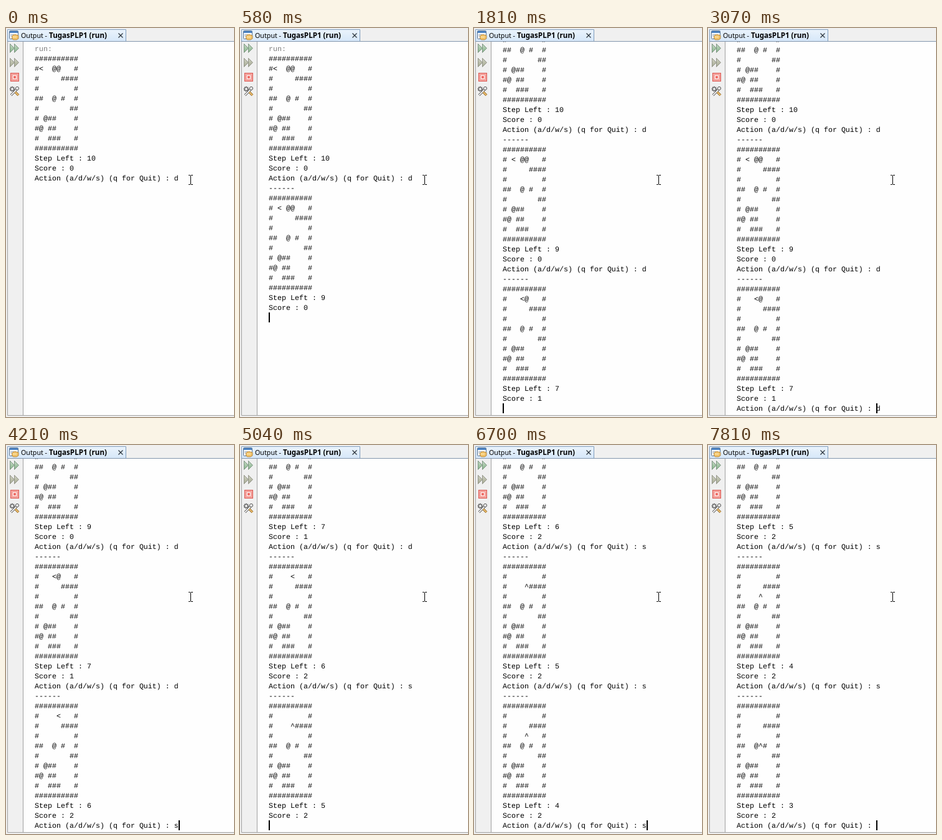
Write an HTML page that moves like this. It is 366x625 px and loops after 8000 ms.

```html
<!DOCTYPE html>
<html lang="en">
<head>
<meta charset="utf-8">
<title>Console game</title>
<style>
  html, body { margin: 0; width: 100%; height: 100%; overflow: hidden; background: #f0f0f0; }
  svg { display: block; }
  .tab { font-family: "Noto Sans", "Open Sans", sans-serif; fill: #000; }
  .con text {
    font: 11.665px "Liberation Mono", "Courier New", monospace;
    white-space: pre; text-rendering: geometricPrecision;
  }
  .con .run { fill: #808080; }
</style>
</head>
<body>
<svg width="366" height="625" viewBox="0 0 366 625">
  <defs>
    <linearGradient id="blue" x2="0" y2="1">
      <stop offset="0" stop-color="#eaf3fc"/><stop offset="1" stop-color="#d6e7f9"/>
    </linearGradient>
    <linearGradient id="green" x2="0" y2="1">
      <stop offset="0" stop-color="#c6d9c6"/><stop offset="1" stop-color="#86b48a"/>
    </linearGradient>
    <linearGradient id="olive" x2="0" y2="1">
      <stop offset="0" stop-color="#d0d2c4"/><stop offset="1" stop-color="#a6aa92"/>
    </linearGradient>
    <clipPath id="view"><path d="M28 22H366V622H28Z"/></clipPath>
    <path id="ff" d="M.5 .5L7.5 7.5L.5 14.5ZM7.5 .5L14.5 7.5L7.5 14.5Z" stroke-linejoin="round"/>
  </defs>

  <!-- window frame -->
  <path fill="#f0f0f0" d="M0 0H366V625H0Z"/>
  <path fill="#fefefe" d="M28 22H366V622H28Z"/>
  <path fill="url(#blue)" d="M2 3H192V21H2Z"/>
  <path fill="none" stroke="#7e9cbd" d="M2.5 21V2.5H192.5V21"/>
  <path stroke="#8195ad" d="M2 21.5H366"/>
  <path fill="none" stroke="#a0a0a0" d="M2.5 22V622.5H366M27.5 22V622"/>

  <!-- tab -->
  <g>
    <rect x="5.5" y="4.5" width="14" height="13" rx="1" fill="#fff" stroke="#55708f"/>
    <path fill="#4f86c6" d="M6 5H19V8H6Z"/>
    <path fill="none" stroke="#9aa9ba" d="M7 10.5H12M7 12.5H10"/>
    <path fill="#f2c46b" stroke="#a9772c" stroke-width=".8" d="M9.5 13.5Q11 10 15 10.5L20 12V17L17 19H11.5Q9 17 9.5 13.5Z"/>
    <path fill="none" stroke="#fff0c8" d="M11 14.5H17"/>
  </g>
  <text class="tab" x="24" y="16" font-size="10.7">Output -</text>
  <text class="tab" x="69" y="16" font-size="11.6" font-weight="700">TugasPLP1 (run)</text>
  <path stroke="#303840" stroke-width="1.3" d="M180.5 8.5L187.5 15.5M187.5 8.5L180.5 15.5"/>

  <!-- toolbar -->
  <use href="#ff" x="6" y="25" fill="url(#green)" stroke="#7f9683"/>
  <use href="#ff" x="6" y="48" fill="url(#olive)" stroke="#94968a"/>
  <rect x="7.5" y="72.5" width="13" height="13" fill="#f4a39d" stroke="#dc5a54"/>
  <rect x="11.5" y="76.5" width="5" height="5" fill="#ef6f68" stroke="#fff"/>
  <g fill="none">
    <circle cx="10" cy="98" r="3.2" stroke="#555" stroke-width="2" stroke-dasharray="1.6 .75"/>
    <circle cx="10" cy="98" r="2.4" fill="#f4f4f4" stroke="#666"/>
    <path stroke="#444" stroke-width="3.6" d="M8 108L17 99"/>
    <path stroke="#f2f2f2" stroke-width="2" d="M8 108L17 99"/>
    <circle cx="18" cy="97" r="2.6" fill="#f2f2f2" stroke="#555"/>
    <path stroke="#8a6424" stroke-width="3.8" d="M15 103L20 108"/>
    <path stroke="#f0c070" stroke-width="2" d="M15 103L20 108"/>
  </g>

  <!-- console -->
  <g clip-path="url(#view)">
    <g id="log" class="con"></g>
    <rect id="caret" width="2" height="16"/>
  </g>
  <path fill="none" stroke="#000" d="M293 236.5H296M297 236.5H300M296.5 237V251M293 251.5H296M297 251.5H300"/>
</svg>
<script>
const LEFT = 46, TOP = 25, ROW = 16, CHAR = 7, TURN = 14, LOOP = 8000;
const PROMPT = "Action (a/d/w/s) (q for Quit) : ";
const log = document.getElementById("log");
const caret = document.getElementById("caret");

const map = `##########
#   @@   #
#     ####
#        #
##  @ #  #
#       ##
# @##    #
#@ ##    #
#  ###   #
##########`.split("\n");

// steps left, score, player column, row, glyph, key pressed
const turns = [
  [10, 0, 1, 1, "<", "d"],
  [9, 0, 2, 1, "<", "d"],
  [7, 1, 4, 1, "<", "d"],
  [6, 2, 5, 1, "<", "s"],
  [5, 2, 5, 2, "^", "s"],
  [4, 2, 5, 3, "^", "s"],
  [3, 2, 5, 4, "^", ""]
];

// time, turn, phase (0 board, 1 prompt, 2 key typed), caret column (-1 hidden)
const START = 0, ASK = 32, END = 33, OFF = -1;
const events = [
  [0, 0, 2, OFF], [300, 0, 2, ASK],
  [580, 1, 0, START], [730, 1, 1, ASK], [1160, 1, 2, END], [1530, 1, 2, ASK],
  [1810, 2, 0, START], [2060, 2, 1, ASK], [2490, 2, 2, END], [2920, 2, 2, OFF], [3070, 2, 2, ASK],
  [3220, 3, 0, START], [3500, 3, 1, ASK], [4060, 3, 1, OFF], [4210, 3, 2, END], [4610, 3, 2, OFF], [4730, 3, 2, ASK],
  [5040, 4, 0, START], [5190, 4, 1, ASK], [5500, 4, 2, END], [6060, 4, 2, ASK],
  [6310, 5, 0, START], [6580, 5, 1, ASK], [6700, 5, 2, END], [7230, 5, 2, OFF], [7380, 5, 2, ASK],
  [7500, 6, 0, START], [7810, 6, 1, ASK]
];

const put = (s, i, c) => s.slice(0, i) + c + s.slice(i + 1);

function addLine(str, row, cls) {
  const el = document.createElementNS("http://www.w3.org/2000/svg", "text");
  el.setAttribute("x", LEFT);
  el.setAttribute("y", TOP + row * ROW + 12);
  if (cls) el.setAttribute("class", cls);
  el.textContent = str;
  log.append(el);
  return el;
}

const blocks = turns.map(([steps, score, x, y, glyph, key], n) => {
  const rows = map.map((s, i) => i === y ? put(s, x, glyph) : s);
  map[y] = put(map[y], x, " ");
  const body = [n ? "------" : "run:", ...rows, "Step Left : " + steps, "Score : " + score]
    .map((s, i) => addLine(s, n * TURN + i, n || i ? "" : "run"));
  return { body, key, ask: addLine("", n * TURN + 13) };
});

let shown = -1;
function draw(t) {
  let i = events.length - 1;
  while (events[i][0] > t) i--;
  if (i === shown) return;
  shown = i;
  const [, turn, phase, col] = events[i];
  const scroll = turn > 1 ? 78 + (turn - 2) * TURN * ROW : 0;
  log.setAttribute("transform", `translate(0 ${-scroll})`);
  blocks.forEach((b, n) => {
    b.body.forEach(el => el.setAttribute("visibility", n <= turn ? "visible" : "hidden"));
    const p = n < turn ? 2 : n > turn ? 0 : phase;
    b.ask.textContent = p ? PROMPT + (p > 1 ? b.key : "") : "";
  });
  caret.setAttribute("visibility", col < 0 ? "hidden" : "visible");
  caret.setAttribute("x", LEFT + Math.max(col, 0) * CHAR);
  caret.setAttribute("y", TOP + (turn * TURN + 13) * ROW - scroll);
}

const t0 = performance.now();
function tick() {
  draw((performance.now() - t0) % LOOP);
  requestAnimationFrame(tick);
}
draw(0);
tick();
</script>
</body>
</html>
```
